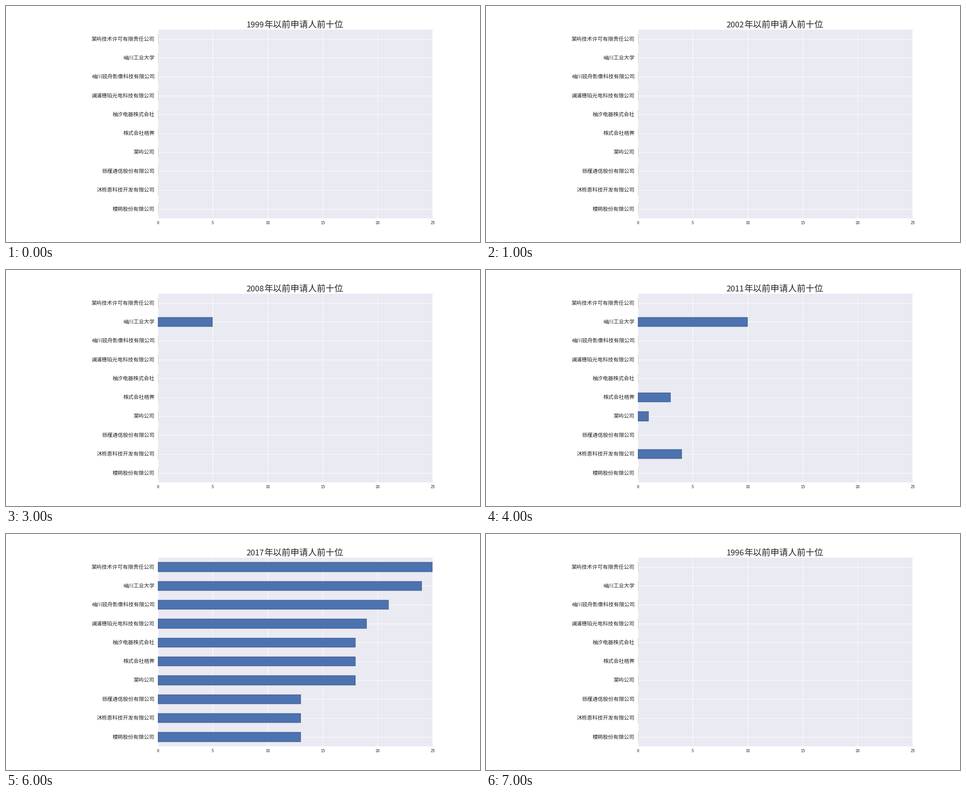
A matplotlib script that plays this animation: 1058x529 px, repeating every 8 s.

```python
import matplotlib.pyplot as plt
from matplotlib.animation import FuncAnimation

W, H, DPI = 1058, 529, 64
PX = 72 / DPI            # one pixel in points
UNIT = W / 15 / DPI      # one design point (15 inch wide layout) in points
INK = "#262626"

plt.rcParams["font.family"] = "Noto Sans CJK JP"
plt.rcParams["text.color"] = INK

APPLICANTS = [
    "棠屿技术许可有限责任公司",
    "岫川工业大学",
    "岫川砚舟影像科技有限公司",
    "澜浦穗珀光电科技有限公司",
    "柚汐电器株式会社",
    "株式会社梧霁",
    "棠屿公司",
    "砾槿通信股份有限公司",
    "沐栎恩科技开发有限公司",
    "稷朔股份有限公司",
]

# Cumulative filings per applicant; years not listed are all zero.
COUNTS = {
    2008: [0, 5, 0, 0, 0, 0, 0, 0, 0, 0],
    2011: [0, 10, 0, 0, 0, 3, 1, 0, 4, 0],
    2014: [8, 14, 12, 0, 13, 18, 17, 12, 12, 7],
    2017: [25, 24, 21, 19, 18, 18, 18, 13, 13, 13],
}
YEARS = list(range(1999, 2018, 3)) + [1996]
ROWS = len(APPLICANTS)

fig = plt.figure(figsize=(W / DPI, H / DPI), dpi=DPI, facecolor="white")
ax = fig.add_axes([0.32, 0.1, 0.58, 0.8], facecolor="#EAEAF2")
ax.set_xlim(0, 25)
ax.set_ylim(ROWS - 0.5, -0.5)
ax.set_xticks(range(0, 26, 5))
ax.set_yticks(range(ROWS), APPLICANTS, va="center")
ax.set_axisbelow(True)
ax.grid(color="white", linewidth=UNIT)
ax.spines[:].set_visible(False)
ax.tick_params(length=0, labelcolor=INK)
ax.tick_params(axis="x", labelsize=9 * UNIT, pad=6 * PX)
ax.tick_params(axis="y", labelsize=12 * UNIT, pad=7 * UNIT)

bars = ax.barh(range(ROWS), [0] * ROWS, height=0.5, color="#4C72B0",
               edgecolor="black", linewidth=0.3 * UNIT)


def title_part(x, text, size, align):
    return fig.text(x / W, 1 - 48 / H, text, fontsize=size * UNIT,
                    ha=align, va="baseline")


year_text = title_part(575.5, "", 18.2, "right")
title_part(576.5, "年以前申请人前十位", 20, "left")


def update(i):
    year = YEARS[i]
    year_text.set_text(str(year))
    for bar, count in zip(bars, COUNTS.get(year, [0] * ROWS)):
        bar.set_width(count)
    return [year_text, *bars]


anim = FuncAnimation(fig, update, frames=len(YEARS), interval=1000,
                     init_func=lambda: update(0), repeat=True,
                     repeat_delay=0, blit=False)
plt.show()
```
